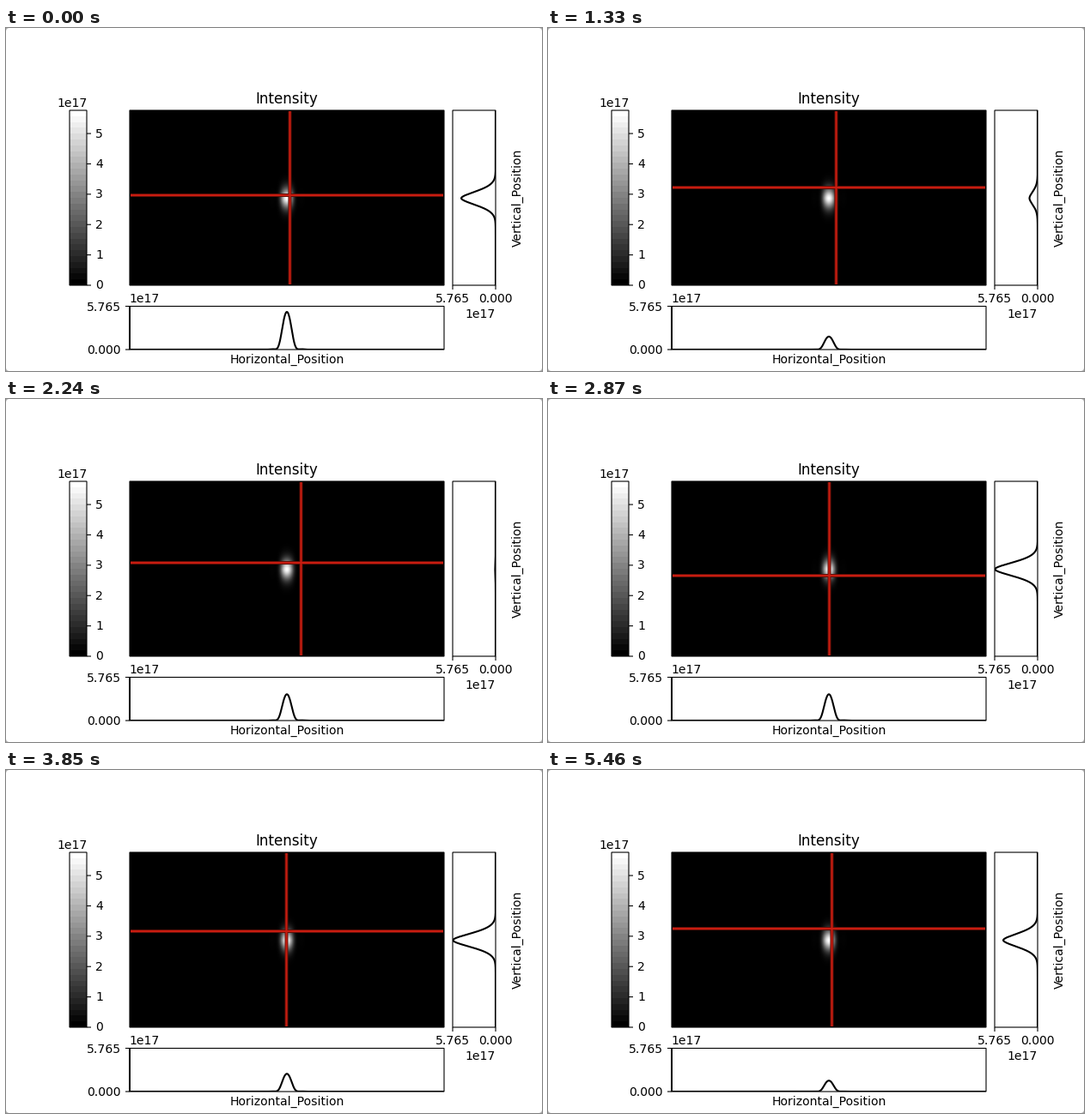
These frames come from a looping animation (624 px wide and 400 px high, 6230 ms). A matplotlib script:

```python
import numpy as np
import matplotlib.pyplot as plt
from matplotlib.animation import FuncAnimation
from matplotlib.patches import FancyBboxPatch, Rectangle

W, H, DPI = 624, 400, 100
PX = 72 / DPI                      # one pixel in points
FRAMES, INTERVAL = 89, 70
PEAK = 5.765

plt.rcParams["font.family"] = "DejaVu Sans"

# Plot areas in pixels: left, top, right, bottom
LEFT, RIGHT, TOP, BOTTOM = 144, 510, 96, 300
DEPTH = 50                         # height of both profile plots
BAR = (LEFT - 70, TOP, LEFT - 50, BOTTOM)
MAP = (LEFT, TOP, RIGHT, BOTTOM)
SIDE = (RIGHT + 10, TOP, RIGHT + 10 + DEPTH, BOTTOM)
BASE = (LEFT, BOTTOM + 24.5, RIGHT, BOTTOM + 25 + DEPTH)
CX, CY = 327, 198.5                # beam centre

# Pointer key poses: frame, x, y
POSES = np.array([(8, 330, 195), (19, 335, 186), (32, 343, 191),
                  (41, 327, 206), (55, 326, 188), (65, 338, 202),
                  (76, 330, 185)])


def beam_x(x):
    d = np.abs(x - CX)
    core = np.exp(-0.0172 * d**2 - 0.00008 * d**4)
    return core + 0.012 * np.exp(-((d - 17) / 4) ** 2)


def beam_y(y):
    return np.exp(-np.abs((y - CY) / 11.3) ** 1.75)


def pointer(frame):
    """Smooth curve through the key poses, on whole pixels."""
    t, points = POSES[:, 0], POSES[:, 1:]
    f = np.clip(frame, t[0], t[-1])
    i = min(np.searchsorted(t, f, side="right") - 1, len(t) - 2)
    slopes = np.gradient(points, t, axis=0)
    h = t[i + 1] - t[i]
    u = (f - t[i]) / h
    pos = ((1 + 2 * u) * (1 - u) ** 2 * points[i]
           + u * (1 - u) ** 2 * h * slopes[i]
           + u * u * (3 - 2 * u) * points[i + 1]
           + u * u * (u - 1) * h * slopes[i + 1])
    return np.round(pos) + (0.5, 0)


fig = plt.figure(figsize=(W / DPI, H / DPI), dpi=DPI, facecolor="#a8a8a8")
ax = fig.add_axes([0, 0, 1, 1])
ax.axis("off")


def line(xs, ys, width=1.1, color="black", z=5):
    return ax.plot(xs, ys, color=color, lw=width * PX, zorder=z, snap=False,
                   solid_capstyle="butt")[0]


def rectangle(area, **kw):
    l, t, r, b = area
    return Rectangle((l, t), r - l, b - t, **kw)


def label(x, y, text, ha="left", size=10.1, **kw):
    ax.text(x, y, text, ha=ha, va="baseline", fontsize=size, zorder=7, **kw)


def gray_image(data, area):
    l, t, r, b = area
    ax.imshow(data, cmap="gray", vmin=0, vmax=1, extent=(l, r, b, t),
              aspect="auto", interpolation="nearest", zorder=2)


# Window with slightly rounded corners
ax.add_patch(FancyBboxPatch((4, 4), W - 8, H - 8, fc="white", ec="none",
                            boxstyle="round,pad=4,rounding_size=4", zorder=0))

xs = np.linspace(LEFT, RIGHT, 733)
ys = np.linspace(TOP, BOTTOM, 409)
gray_image(np.outer(beam_y(ys), beam_x(xs)), MAP)
gray_image(np.linspace(1, 0, 30)[:, None], BAR)
for area in (BAR, MAP, SIDE, BASE):
    ax.add_patch(rectangle(area, fill=False, ec="black", lw=1.1 * PX,
                           zorder=6, snap=False))
line([LEFT, LEFT], [BASE[1], BASE[3]], 2)

# Colour bar scale
for n in range(6):
    y = BOTTOM - n * (BOTTOM - TOP) / PEAK
    line([BAR[2], BAR[2] + 5], [y, y])
    label(104, y + 4.5, str(n))
label(94.5, 92, "1e17", "right")

# Profile scales
for x, y, text in ((SIDE[0], BASE[1], "5.765"), (SIDE[2], BASE[3], "0.000")):
    line([LEFT - 5, LEFT], [y, y])
    label(134, y + 5.5, text, "right")
    line([x, x], [BOTTOM, BOTTOM + 5])
    label(x, 320, text, "center")
label(143.5, 320, "1e17")
label(SIDE[2], 338, "1e17", "right")

label(327, 88, "Intensity", "center", 12.1)
label(327, 391, "Horizontal_Position", "center")
label(599.5, 197.5, "Vertical_Position", "center", rotation=90,
      rotation_mode="anchor")

# Crosshair: soft dark edge under a bright core
STROKES = ((4, "#5f0f08", 3), (2.1, "#c81c10", 4))
across = [line([LEFT + 1, RIGHT - 1], [0, 0], *s) for s in STROKES]
down = [line([0, 0], [TOP + 1, BOTTOM - 1], *s) for s in STROKES]

side_curve, base_curve = line([], [], 2.08), line([], [], 2.08)
for curve, area in ((side_curve, SIDE), (base_curve, BASE)):
    curve.set_clip_path(rectangle(area, transform=ax.transData))

ax.set_xlim(0, W)
ax.set_ylim(H, 0)


def update(frame):
    x, y = pointer(frame)
    for stroke in across:
        stroke.set_ydata([y, y])
    for stroke in down:
        stroke.set_xdata([x, x])
    side_curve.set_data(SIDE[2] - DEPTH * beam_x(x) * beam_y(ys), ys)
    base_curve.set_data(xs, BASE[3] - DEPTH * beam_y(y) * beam_x(xs))
    return (*across, *down, side_curve, base_curve)


anim = FuncAnimation(fig, update, frames=FRAMES, interval=INTERVAL,
                     repeat=True, repeat_delay=0, blit=False)
plt.show()
```
